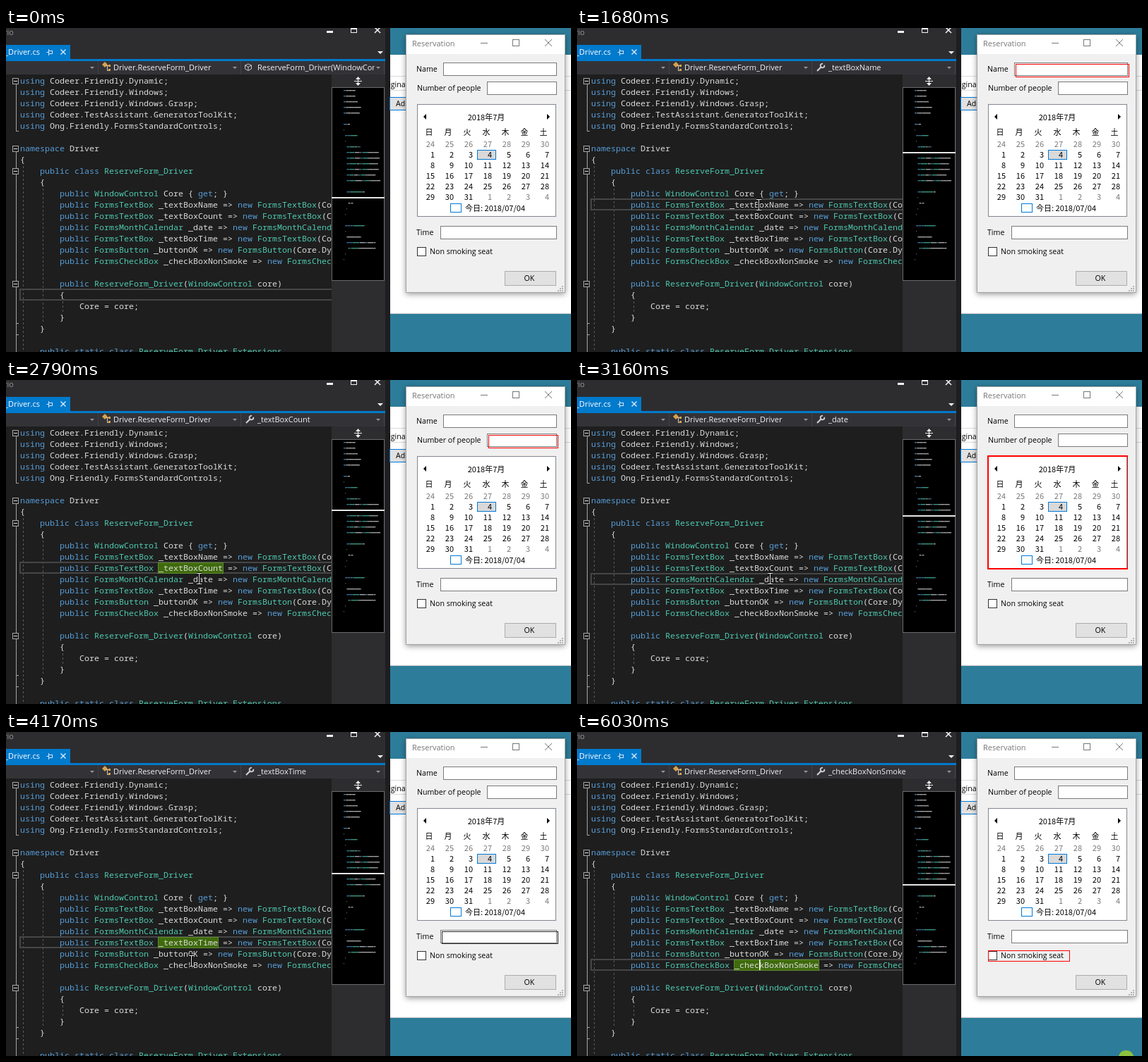
An HTML page with a canvas for the animation above (6.2 s loop, 800 by 460 pixels).

```html
<!DOCTYPE html>
<html lang="en">
<head>
<meta charset="utf-8">
<title>Form driver inspection</title>
<style>
html, body { margin: 0; width: 100%; height: 100%; overflow: hidden; background: #1e1e1e; }
canvas { display: block; width: 800px; height: 460px; }
</style>
</head>
<body>
<canvas id="stage" width="800" height="460"></canvas>
<script>
const g = document.getElementById('stage').getContext('2d');
const LOOP = 6200;
const MONO = '11.667px "Noto Sans Mono", monospace';
const UI = '11px "Open Sans", sans-serif';
const LABEL = '10.6px "Open Sans", "Noto Sans CJK JP", sans-serif';
const CAL = '11px "Noto Sans CJK JP", "Noto Sans CJK", sans-serif';
const PLAIN = '#dcdcdc', KEY = '#569cd6', TYPE = '#4ec9b0', RED = '#f00', DARK = '#2a2a2a';

const code = `using Codeer.Friendly.Dynamic;
using Codeer.Friendly.Windows;
using Codeer.Friendly.Windows.Grasp;
using Codeer.TestAssistant.GeneratorToolKit;
using Ong.Friendly.FormsStandardControls;

namespace Driver
{
    public class ReserveForm_Driver
    {
        public WindowControl Core { get; }
        public FormsTextBox _textBoxName => new FormsTextBox(Core.Dynamic().textBoxName);
        public FormsTextBox _textBoxCount => new FormsTextBox(Core.Dynamic().textBoxCount);
        public FormsMonthCalendar _date => new FormsMonthCalendar(Core.Dynamic().date);
        public FormsTextBox _textBoxTime => new FormsTextBox(Core.Dynamic().textBoxTime);
        public FormsButton _buttonOK => new FormsButton(Core.Dynamic().buttonOK);
        public FormsCheckBox _checkBoxNonSmoke => new FormsCheckBox(Core.Dynamic().checkBox);

        public ReserveForm_Driver(WindowControl core)
        {
            Core = core;
        }
    }

    public static class ReserveForm_Driver_Extensions
    {
        [WindowDriverIdentify(TypeFullName)]
        public static ReserveForm_Driver AttachReserve(this WindowsAppFriend app)
            => new ReserveForm_Driver(app.WaitForIdentifyFromTypeFullName(name));
    }
}`.split('\n');

const colorOf = word =>
  /^(using|namespace|public|class|get|new|static|this)$/.test(word) ? KEY :
  /^(Forms(?!St)|WindowControl|ReserveForm)/.test(word) ? TYPE : PLAIN;

const tokens = code.flatMap((line, row) =>
  [...line.matchAll(/\w+|[^\w\s]+/g)].map(m =>
    ({ word: m[0], row, col: m.index, color: colorOf(m[0]) })));

const rowY = row => 75 + 16 * row;
const colX = col => 20 + 7 * col;

// Clicked members: row, click time, highlight time, and the outlined control
const stages = [
  { row: 19, click: 0, title: 'ReserveForm_Driver(WindowControl core)' },
  { row: 10, click: 580, mark: 1040, title: 'Core', frame: 730, rect: [559, 6, 240, 376] },
  { row: 11, click: 1520, mark: 1920, title: '_textBoxName', frame: 1590, dark: 1700, rect: [621, 51, 160, 18] },
  { row: 12, click: 2360, mark: 2720, title: '_textBoxCount', frame: 2430, rect: [683, 78, 98, 18] },
  { row: 13, click: 3070, mark: 3480, title: '_date', frame: 3140, dark: 3280, rect: [582, 108, 197, 160] },
  { row: 14, click: 3700, mark: 4090, title: '_textBoxTime', frame: 3780, dark: 3860, rect: [617, 283, 164, 17] },
  { row: 15, click: 4470, mark: 4950, title: '_buttonOK', frame: 4550, dark: 4700, rect: [707, 346, 73, 20] },
  { row: 16, click: 5020, mark: 5420, title: '_checkBoxNonSmoke', frame: 5100, rect: [582, 310, 115, 15] }
];

// Pointer moves: start, end, steps, x, y
const moves = [
  [70, 430, 6, 236, 247], [1040, 1280, 4, 257, 251], [1780, 1920, 3, 250, 264],
  [2580, 2790, 4, 273, 282], [3200, 3480, 5, 266, 299], [4090, 4170, 2, 262, 325],
  [4950, 5020, 2, 258, 331], [5180, 5420, 4, 655, 427]
];

const tips = [
  [2140, 2290, 12, 247], [2910, 3070, 13, 270], [3630, 3700, 14, 265], [4320, 4470, 15, 265]
];

function box(x, y, w, h, fill, stroke) {
  if (fill) { g.fillStyle = fill; g.fillRect(x, y, w, h); }
  if (stroke) { g.strokeStyle = stroke; g.lineWidth = 1; g.strokeRect(x + .5, y + .5, w, h); }
}

function text(s, x, y, font, color, align = 'left') {
  g.font = font;
  g.fillStyle = color;
  g.textAlign = align;
  g.fillText(s, x, y);
}

function path(color, width, ...p) {
  g.strokeStyle = color;
  g.lineWidth = width;
  g.beginPath();
  for (let i = 0; i < p.length; i += 2) g.lineTo(p[i], p[i + 1]);
  g.stroke();
}

function poly(color, ...p) {
  g.fillStyle = color;
  g.beginPath();
  for (let i = 0; i < p.length; i += 2) g.lineTo(p[i], p[i + 1]);
  g.fill();
}

function cross(x, y, r, color, width = 1) {
  path(color, width, x - r, y - r, x + r, y + r);
  path(color, width, x - r, y + r, x + r, y - r);
}

function clipped(x, y, w, h, draw) {
  g.save();
  g.beginPath();
  g.rect(x, y, w, h);
  g.clip();
  draw();
  g.restore();
}

function wrench(x, y, color, s = 1) {
  path(color, 2.2 * s, x - 5 * s, y + 5 * s, x + s, y - s);
  g.lineWidth = 1.8 * s;
  g.beginPath();
  g.arc(x + 2.5 * s, y - 2.5 * s, 2.8 * s, -.3, 4.9);
  g.stroke();
}

function drawDesktop() {
  box(537, 0, 7, 460, '#1e1e20');
  box(544, 0, 256, 460, '#2d7d9a');
  box(544, 38, 256, 367, '#fff');
  box(544, 405, 256, 1, '#c5c5c5');
  box(544, 68, 256, 1, '#d9d9d9');
  box(544, 88, 256, 1, '#d9d9d9');
  text('iginal', 542, 84, LABEL, '#000');
  box(543, 98, 40, 18, '#e1e1e1', '#0078d7');
  text('Add', 552, 111, LABEL, '#000');
}

function drawCalendar() {
  box(582, 108, 196, 159, '#fff', '#828790');
  text('2018年7月', 680, 131, CAL, '#000', 'center');
  poly('#000', 595, 122, 595, 130, 591, 126);
  poly('#000', 766, 122, 766, 130, 770, 126);
  [...'日月火水木金土'].forEach((day, i) => text(day, 599 + 27 * i, 152, CAL, '#000', 'center'));
  box(667, 173, 26, 13, '#d9d9d9', '#0078d7');
  for (let i = 0; i < 42; i++) {
    const d = i - 6, out = d < 1 || d > 31;
    text(d < 1 ? d + 30 : d > 31 ? d - 31 : d, 607 + 27 * (i % 7), 169 + 15 * Math.floor(i / 7),
      CAL, out ? '#787878' : '#000', 'right');
  }
  box(629, 249, 15, 12, '#fff', '#0078d7');
  text('今日: 2018/07/04', 650, 260, CAL, '#000');
}

function drawDialog() {
  g.save();
  g.shadowColor = 'rgba(0,0,0,.4)';
  g.shadowBlur = 8;
  g.shadowOffsetY = 2;
  box(566, 9, 226, 367, '#f0f0f0');
  g.restore();
  box(566, 9, 225, 28, '#fff');
  box(566, 9, 225, 366, null, '#a0a4a6');
  text('Reservation', 575, 26, UI, '#777');
  path('#777', 1, 672, 21.5, 682, 21.5);
  box(717, 16, 9, 9, null, '#777');
  cross(768, 21, 5, '#777');
  text('Name', 581, 62, LABEL, '#000');
  text('Number of people', 582, 89, LABEL, '#000');
  text('Time', 581, 294, LABEL, '#000');
  box(619, 49, 160, 18, '#fff', '#7a7a7a');
  box(681, 76, 98, 18, '#fff', '#7a7a7a');
  box(615, 281, 164, 18, '#fff', '#7a7a7a');
  drawCalendar();
  box(582, 311, 12, 12, '#fff', '#333');
  text('Non smoking seat', 600, 321, LABEL, '#000');
  box(706, 345, 72, 20, '#e1e1e1', '#adadad');
  text('OK', 741, 359, LABEL, '#000', 'center');
  for (let i = 0; i < 3; i++)
    for (let j = 0; j <= i; j++) box(787 - 3 * j, 366 + 3 * i, 2, 2, '#b4b4b4');
}

function drawHeader(stage) {
  box(0, 0, 537, 47, '#2d2d30');
  text('rio', 11, 10, UI, '#999', 'right');
  box(454, 4, 9, 3, '#f1f1f1');
  box(488, -1, 8, 7, null, '#f1f1f1');
  box(488, 0, 9, 2, '#f1f1f1');
  cross(526, 3, 4, '#f1f1f1', 1.6);
  box(0, 24, 91, 21, '#007acc');
  box(0, 44, 537, 3, '#007acc');
  text('_Driver.cs', 48, 38, UI, '#fff', 'right');
  path('#d0e6f5', 1, 57.5, 34.5, 60.5, 34.5);
  box(60, 32, 5, 4, null, '#d0e6f5');
  path('#d0e6f5', 1, 60.5, 30, 60.5, 39);
  cross(81, 34, 3.5, '#d0e6f5', 1.5);
  poly('#f1f1f1', 526, 33, 534, 33, 530, 37);
  box(0, 47, 537, 19, '#333337');
  for (const x of [131, 333, 536]) {
    box(x - 1, 47, 1, 19, '#434346');
    poly('#999', x - 12, 55, x - 6, 55, x - 9, 58);
  }
  poly('#d9a24c', 136, 52, 140, 48, 144, 52, 140, 56);
  path('#d0d0d0', 1, 142, 53.5, 148, 53.5);
  path('#d0d0d0', 1, 143.5, 54, 143.5, 60.5, 147, 60.5);
  box(145, 52, 3, 3, '#d9a24c');
  box(145, 58, 3, 3, '#d9a24c');
  text('Driver.ReserveForm_Driver', 152, 60, UI, '#f1f1f1');
  if (stage.mark) wrench(345, 56, '#d0d0d0');
  else {
    path('#c8c8c8', 1, 343, 51, 347.5, 53, 347.5, 58, 343, 60.5, 338.5, 58, 338.5, 53, 343, 51);
    path('#c8c8c8', 1, 338.5, 53, 343, 55.5, 347.5, 53);
    path('#c8c8c8', 1, 343, 55.5, 343, 60);
  }
  clipped(356, 47, 166, 19, () => text(stage.title, 356, 60, UI, '#f1f1f1'));
}

function drawFolds() {
  const gray = '#a5a5a5';
  path(gray, 1, 14.5, 80, 14.5, 146.5, 18, 146.5);
  path(gray, 1, 14.5, 176, 14.5, 460);
  path(gray, 1, 14, 419.5, 18, 419.5);
  path(gray, 1, 14, 435.5, 18, 435.5);
  for (const row of [0, 6, 8, 18]) {
    const y = rowY(row);
    box(9, y - 4, 8, 8, '#1e1e1e', gray);
    path('#dcdcdc', 1, 11, y + .5, 16, y + .5);
  }
  g.setLineDash([3, 3]);
  path('#5a5a5a', 1, 24.5, 196, 24.5, 460);
  path('#5a5a5a', 1, 52.5, 228, 52.5, 419);
  path('#5a5a5a', 1, 80.5, 388, 80.5, 403);
  g.setLineDash([]);
}

function drawEditor(stage, t) {
  const y = rowY(stage.row), marked = stage.mark && t >= stage.mark;
  box(0, 66, 461, 394, '#1e1e1e');
  drawFolds();
  g.strokeStyle = '#464646';
  g.lineWidth = 2;
  g.strokeRect(20, y - 8, 450, 15);
  for (const { word, row, col, color } of tokens) {
    if (row > 24) break;
    const x = colX(col), w = word.length * 7;
    if (marked && word === stage.title) {
      if (row === stage.row) box(x - 1, rowY(row) - 8, w + 1, 15, '#3f6b0c', '#5f8a32');
      else box(x - 1, rowY(row) - 8, w + 1, 15, '#0e3a66', '#5c81a6');
    }
    text(word, x, rowY(row) + 4, MONO, color);
  }
  if (t >= 5590) box(258, 323, 1.5, 15, '#fff');
}

function drawMap(stage) {
  box(461, 66, 76, 394, '#2d2d30');
  path('#f1f1f1', 1, 493, 75.5, 504, 75.5);
  path('#f1f1f1', 1, 498.5, 70, 498.5, 81);
  poly('#f1f1f1', 495, 73, 498.5, 69, 502, 73);
  poly('#f1f1f1', 495, 78, 498.5, 82, 502, 78);
  box(461, 84, 74, 274, '#000', '#6a6a6a');
  g.globalAlpha = .75;
  for (const { word, row, col, color } of tokens)
    box(478 + col * .56, 88 + 8 * row, word.length * .56, 1.4, color);
  g.globalAlpha = 1;
  box(461, 168 + 8 * (stage.row - 10), 75, 2, '#e6e6e6');
}

function drawFrame({ frame, dark, rect, title }, t) {
  if (!rect || t < frame) return;
  const [x, y, w, h] = rect;
  box(x, y, w, h, null, t >= dark ? DARK : RED);
  if (title === '_date') {
    box(x - 1, y - 1, w + 1, h + 1, null, t >= dark ? '#666' : RED);
    box(x, y + h - 1, w, 2, RED);
  }
}

function drawTip(row, x) {
  const [, type, name] = code[row].trim().split(' '), y = rowY(row) + 8;
  const parts = [[type + ' ', TYPE], ['ReserveForm_Driver', TYPE], ['.' + name + ' { ', '#f1f1f1'],
    ['get', KEY], ['; }', '#f1f1f1']];
  g.font = UI;
  box(x, y, g.measureText(parts.map(p => p[0]).join('')).width + 50, 32, '#424245', '#505053');
  wrench(x + 21, y + 17, '#f1f1f1', 1.2);
  let left = x + 34;
  for (const [s, color] of parts) {
    text(s, left, y + 21, UI, color);
    left += g.measureText(s).width;
  }
}

function drawPointer(t) {
  if (t < 70 || t >= 5420) return;
  let x = 655, y = 429;
  for (const [start, end, steps, toX, toY] of moves) {
    if (t < start) break;
    const step = (end - start) / (steps - 1);
    const p = Math.min(1, (Math.floor((t - start) / step) + 1) / steps);
    x += (toX - x) * p;
    y += (toY - y) * p;
  }
  x = Math.round(x);
  y = Math.round(y);
  if (x < 461) {
    for (const [color, width] of [['#000', 3], ['#f1f1f1', 1]]) {
      path(color, width, x + .5, y - 7, x + .5, y + 7);
      path(color, width, x - 3, y - 7.5, x + 4, y - 7.5);
      path(color, width, x - 3, y + 7.5, x + 4, y + 7.5);
    }
    return;
  }
  const arrow = [0, 0, 0, 16, 4, 13, 7, 18, 9, 17, 6.5, 12, 11, 12, 0, 0].map((v, i) => v + (i % 2 ? y : x));
  poly('#fff', ...arrow);
  path('#000', 1, ...arrow);
}

function draw(t) {
  const stage = stages.filter(s => t >= s.click).pop();
  g.clearRect(0, 0, 800, 460);
  drawDesktop();
  drawDialog();
  clipped(0, 66, 461, 394, () => drawEditor(stage, t));
  drawHeader(stage);
  drawMap(stage);
  drawFrame(stage, t);
  for (const [from, to, row, x] of tips) if (t >= from && t < to) drawTip(row, x);
  drawPointer(t);
  if (t >= 6030) {
    g.fillStyle = '#8fc13e';
    g.beginPath();
    g.arc(777.5, 463, 11, 0, 7);
    g.fill();
  }
}

const begin = performance.now();
function tick() {
  draw((performance.now() - begin) % LOOP);
  requestAnimationFrame(tick);
}
tick();
</script>
</body>
</html>
```
